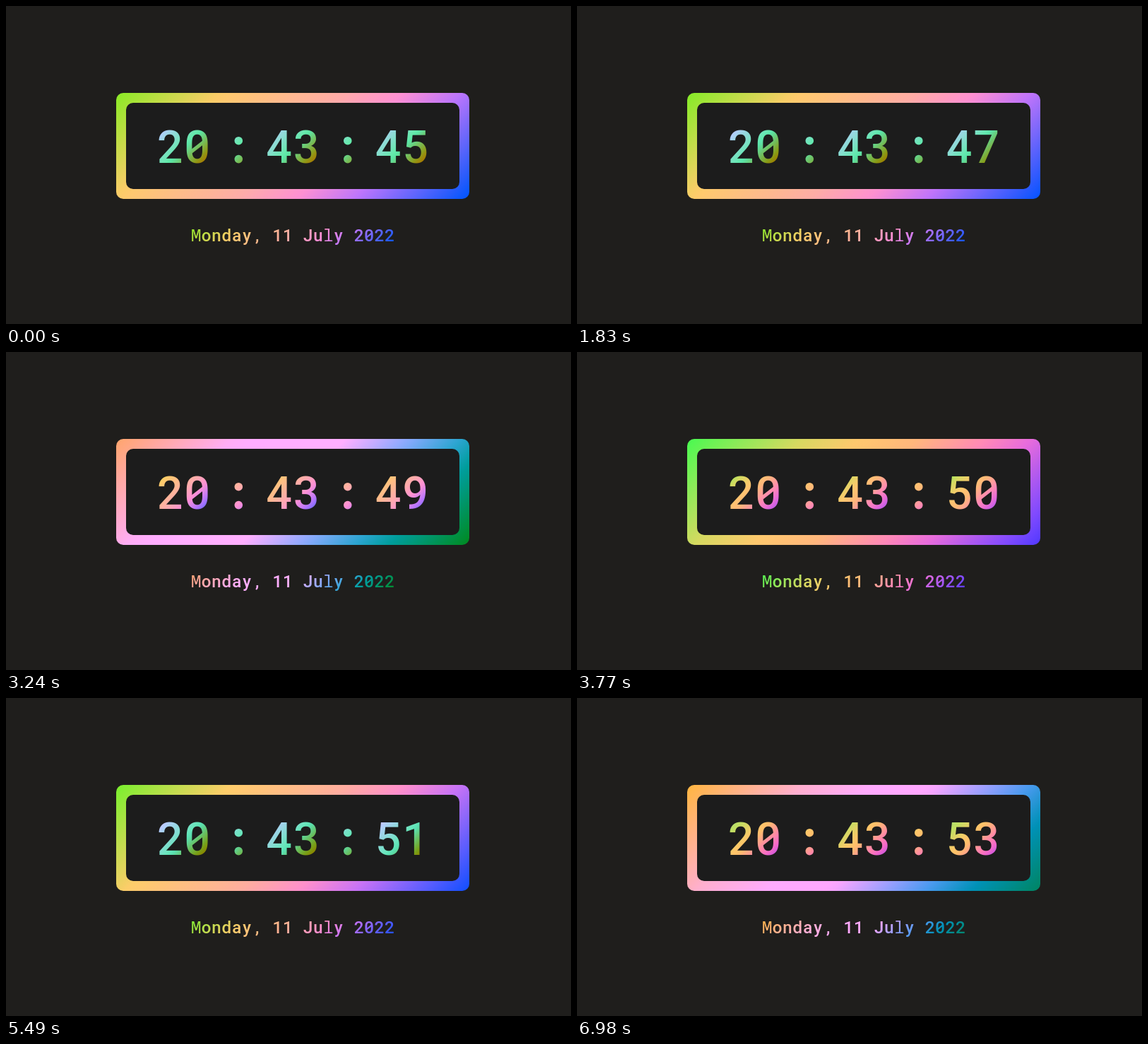
Write an HTML page that moves like this. It is 800x450 px and loops after 7.01 s.

```html
<!DOCTYPE html>
<html lang="en">
<head>
<meta charset="utf-8">
<title>Rainbow clock</title>
<style>
  html, body { margin: 0; width: 100%; height: 100%; overflow: hidden; background: #1f1e1c; }
  svg { display: block; width: 100vw; height: 100vh; }
  text { font-family: Roboto, sans-serif; font-weight: 500; text-anchor: middle; }
  .wide { font-family: "Noto Sans Mono", monospace; }
  .time text { font-size: 64px; }
  .date { font-size: 24px; }
</style>
</head>
<body>
<svg viewBox="0 0 800 450">
  <defs id="defs"></defs>
  <g transform="translate(156 123)">
    <rect width="500" height="150" rx="10" fill="url(#frame)"/>
    <rect x="14" y="14" width="472" height="122" rx="10" fill="#1c1c1c"/>
  </g>
  <g class="time" id="time" fill="url(#digits)" stroke="none"></g>
  <g transform="translate(262 308)" fill="url(#date)">
    <text class="date" id="dateText" y="25"></text>
    <path d="M248.300 19.600L255.700 13.600" stroke="url(#date)" stroke-width="2"/>
  </g>
</svg>
<script>
const LOOP = 7010, TURN = 1820, SECOND = 910;
const FIRST_AGE = 790;      // time already spent in the opening second
const START_ANGLE = 311.5;
const STEPS = 40;
const NS = "http://www.w3.org/2000/svg";
const COLORS = [[36, 255, 139], [172, 229, 102], [255, 197, 95], [255, 105, 180], [154, 37, 255]];

function add(parent, tag, attrs, text) {
  const node = document.createElementNS(NS, tag);
  for (const key in attrs) node.setAttribute(key, attrs[key]);
  if (text) node.textContent = text;
  parent.appendChild(node);
  return node;
}

const byId = id => document.getElementById(id);
const clamp = v => Math.max(0, Math.min(255, v));

// Same result as the CSS hue-rotate() filter
function hueRotate([r, g, b], degrees) {
  const a = degrees * Math.PI / 180, c = Math.cos(a), s = Math.sin(a);
  const y = 0.213 * r + 0.715 * g + 0.072 * b;
  const u = (r - y) * c + (b - y) * s;
  const v = (b - y) * c - (r - y) * s;
  return [y + u, y - (0.213 * u + 0.072 * v) / 0.715, y + v].map(clamp);
}

function baseColor(p) {
  const pos = p * (COLORS.length - 1);
  const i = Math.min(Math.floor(pos), COLORS.length - 2);
  return COLORS[i].map((v, k) => v + (COLORS[i + 1][k] - v) * (pos - i));
}

// A 135deg gradient for a box of w by h
function makeGradient(id, w, h) {
  const end = (w + h) / 2;
  const node = add(byId("defs"), "linearGradient",
    { id, gradientUnits: "userSpaceOnUse", x1: 0, y1: 0, x2: end, y2: end });
  return Array.from({ length: STEPS + 1 }, (_, i) => add(node, "stop", { offset: i / STEPS }));
}

function paint(stops, ...angles) {
  stops.forEach((stop, i) => {
    const rgb = angles.reduce(hueRotate, baseColor(i / STEPS)).map(Math.round);
    stop.setAttribute("stop-color", `rgb(${rgb})`);
  });
}

const frameStops = makeGradient("frame", 500, 150);
const dateStops = makeGradient("date", 288, 32);
const digitStops = makeGradient("digits", 77, 84);

function makePair(x) {
  const group = add(byId("time"), "g", { transform: `translate(${x} 155)` });
  return {
    text: add(group, "text", { x: "19.200 57.600", y: 67 }),
    slash: add(group, "path", { stroke: "url(#digits)", "stroke-width": 5.2, fill: "none" })
  };
}

function setPair(pair, value) {
  if (pair.text.textContent === value) return;
  pair.text.textContent = value;
  pair.slash.setAttribute("d", value[1] === "0" ? "M47.600 52.500L67.600 37" : "M0 0");
}

function makeColon(x) {
  const group = add(byId("time"), "g", { transform: `translate(${x} 155)` });
  for (const cy of [35.7, 61.6]) add(group, "circle", { cx: 39.3, cy, r: 5.8 });
}

const [hours, minutes, seconds] = [213, 367.5, 522].map(makePair);
[290, 444.5].forEach(makeColon);
setPair(hours, "20");
setPair(minutes, "43");

[..."Monday, 11 July 2022"].forEach((char, i) => {
  if (char === " ") return;
  const attrs = { x: 14.4 * (i + 0.5) };
  if ("Ml".includes(char)) attrs.class = "wide";
  add(byId("dateText"), "tspan", attrs, char);
});

function draw(t) {
  const angle = START_ANGLE + 360 * t / TURN;
  const elapsed = t + FIRST_AGE;
  // The digits start their own rotation again on every tick
  const ownAngle = 360 * (elapsed % SECOND) / TURN;
  setPair(seconds, String(45 + Math.floor(elapsed / SECOND)));
  paint(frameStops, angle);
  paint(dateStops, angle);
  paint(digitStops, ownAngle, angle);
}

const start = performance.now();
function tick() {
  draw((performance.now() - start) % LOOP);
  requestAnimationFrame(tick);
}
tick();
</script>
</body>
</html>
```
